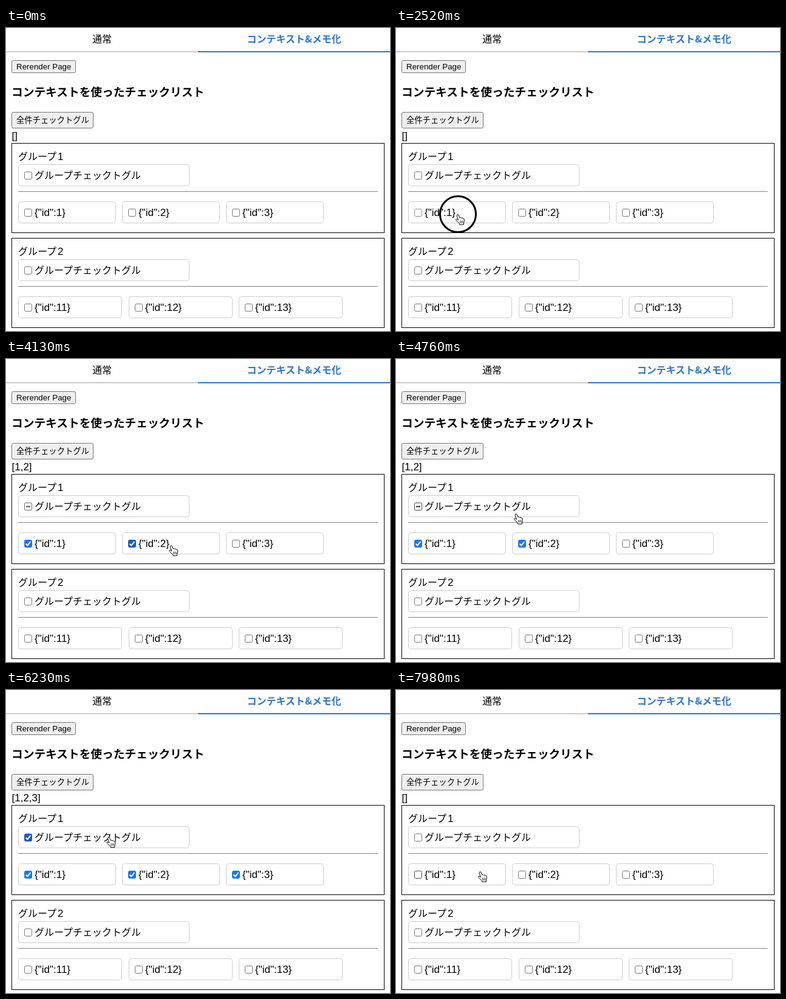
Animation of 632x498 px, one loop 8 s. Source, as an HTML page:

```html
<!DOCTYPE html>
<html lang="ja">
<head>
<meta charset="utf-8">
<style>
  html, body { margin: 0; width: 100%; height: 100%; overflow: hidden; background: #fff; }
  svg { display: block; width: 632px; height: 498px; }
  text { font: 16px "Noto Sans CJK JP", "Noto Sans CJK", sans-serif; white-space: pre; }
  .latin { font: 17px "Liberation Sans", Arial, sans-serif; }
  .button { font-size: 13.33px; }
  .small { font: 13.33px "Liberation Sans", Arial, sans-serif; }
  .heading { font-size: 18.72px; font-weight: 700; }
  .tab { font-weight: 700; fill: #3178c6; }
</style>
</head>
<body>
<svg id="stage" viewBox="0 0 632 498"></svg>
<script>
const stage = document.getElementById('stage');
const LOOP = 8000, STEP = 70;

function add(name, attrs, parent = stage) {
  const node = document.createElementNS('http://www.w3.org/2000/svg', name);
  set(node, attrs);
  parent.append(node);
  return node;
}
function set(node, attrs) {
  for (const key in attrs) node.setAttribute(key, attrs[key]);
}
function label(x, y, content, cls = '') {
  const node = add('text', { x, y, class: cls });
  node.textContent = content;
  return node;
}
// Outline whose outer edge is exactly x, y, width, height.
function frame(x, y, width, height, stroke, rx = 0, fill = 'none') {
  return add('rect', { x: x + .5, y: y + .5, width: width - 1, height: height - 1, rx, stroke, fill });
}
function show(node, visible) {
  node.style.display = visible ? '' : 'none';
}

// Checkbox inside a bordered label; remembers its hit area.
function checkbox(x, y, width, content, cls) {
  frame(x, y, width, 36, '#ccc', 4);
  const box = frame(x + 10, y + 12, 13, 13, '#767676', 2);
  const tick = add('path', {
    d: `M${x + 12.6} ${y + 18.7}l2.7 2.8 5-6.4`, fill: 'none', stroke: '#fff', 'stroke-width': 2
  });
  const dash = add('path', { d: `M${x + 13} ${y + 18.5}h7`, 'stroke-width': 2 });
  label(x + 27, y + 24, content, cls);
  return { x, y, width, box, tick, dash };
}

function group(y, number, ids, width, pitch) {
  frame(9, y, 614, 148, '#000');
  label(20, y + 28, 'グループ');
  label(85, y + 28, number, 'latin');
  const toggle = checkbox(20, y + 35, 282, 'グループチェックトグル');
  add('rect', { x: 20, y: y + 79, width: 592, height: 1.3, fill: '#9a9a9a' });
  const items = ids.map((id, i) =>
    checkbox(20 + Math.round(i * pitch), y + 96, width, `{"id":${id}}`, 'latin'));
  return { toggle, items };
}

label(142, 24, '通常');
label(396.5, 24, 'コンテキスト&メモ化', 'tab');
add('rect', { x: 0, y: 38, width: 316, height: 2, fill: '#ccc' });
add('rect', { x: 316, y: 38, width: 316, height: 2, fill: '#3178c6' });
frame(9, 53, 106, 21, '#767676', 2.5, '#efefef');
label(17, 68, 'Rerender Page', 'small');
label(9, 112, 'コンテキストを使ったチェックリスト', 'heading');
frame(9, 138, 135, 27, '#767676', 2.5, '#efefef');
label(17, 156, '全件チェックトグル', 'button');
const list = label(9.5, 183, '[]', 'latin');
const first = group(189, 1, [1, 2, 3], 161, 171);
const second = group(345, 2, [11, 12, 13], 171, 181.5);
const boxes = [first.toggle, ...first.items, second.toggle, ...second.items];

const ring = add('circle', { fill: 'none', stroke: '#000', 'stroke-width': 3 });
const arrow = add('path', {
  d: 'M0 0V14L3.2 11 5.4 16 7.8 15 5.7 10.2H10Z', stroke: '#fff', 'stroke-width': 1.2, 'paint-order': 'stroke'
});
const hand = add('g', { stroke: '#000', 'stroke-linejoin': 'round', 'stroke-linecap': 'round' });
add('path', {
  d: 'M-2 2.2Q-1.6 -.4 .8 1.2L2.8 5.8Q4.6 4.8 5.5 6.4Q7.4 5.4 8.2 7.2Q10.3 6.8 10.4 9.2' +
     'Q10.6 12 9.4 14.2V17.2H2.6V15.6L-1.4 12Q-4.6 8.6 -2.8 8Q-1.4 7.8 .2 9.4Z',
  fill: '#fff'
}, hand);
add('path', { d: 'M3.6 11v3.4M5.7 11v3.4M7.8 11v3.4', fill: 'none', 'stroke-width': .8 }, hand);

// Time, x, y of the pointer tip.
const path = [
  [630, 251, 435], [1330, 101, 308.5], [1960, 102, 306], [2730, 102, 306], [3150, 282, 308],
  [3360, 253, 306.5], [3990, 253, 306.5], [4480, 350, 304], [4760, 198, 254], [5250, 208, 249],
  [5390, 169.5, 241.5], [7490, 169.5, 241.5], [7980, 139, 298]
];
function pointerAt(t) {
  const next = Math.max(1, path.findIndex(key => key[0] >= t));
  const [t0, x0, y0] = path[next - 1], [t1, x1, y1] = path[next];
  const p = (t - t0) / (t1 - t0), ease = p * p * (3 - 2 * p);
  return [x0 + (x1 - x0) * ease, y0 + (y1 - y0) * ease];
}

const presses = [2520, 3640, 5600, 6790];
const PRESS_TIME = 210;
const rings = [[1470, 21], [2520, 29.5], [3710, 29.5], [5600, 29.5], [6790, 29.5]];

function checkedAt(t) {
  const done = presses.filter(start => t >= start + PRESS_TIME).length;
  return [[], [1], [1, 2], [1, 2, 3], []][done];
}

function paintBox({ box, tick, dash }, state, hover, active) {
  const pick = (normal, over, down) => active ? down : hover ? over : normal;
  const grey = pick('#767676', '#4f4f4f', '#8d8d8d');
  const blue = pick('#1677f2', '#175cc0', '#3793ff');
  const on = state === 'on', mixed = state === 'mixed';
  set(box, { stroke: on ? blue : mixed ? pick('#666', '#444', '#777') : grey, fill: on ? blue : '#fff' });
  set(dash, { stroke: pick('#505050', '#303030', '#666') });
  show(tick, on);
  show(dash, mixed);
}

function render(t) {
  const visible = t >= 630, focused = t >= 1960;
  const [x, y] = visible ? pointerAt(t) : [-99, -99];
  const pressed = presses.some(start => t >= start && t < start + PRESS_TIME);
  const target = focused && boxes.find(b => x >= b.x && x < b.x + b.width && y >= b.y && y < b.y + 36);
  const checked = checkedAt(t);

  list.textContent = `[${checked}]`;
  for (const box of boxes) {
    const index = first.items.indexOf(box);
    let state = checked.includes(index + 1) ? 'on' : 'off';
    if (box === first.toggle) state = ['off', 'mixed', 'mixed', 'on'][checked.length];
    paintBox(box, state, box === target, box === target && pressed);
  }

  show(arrow, visible && !target);
  show(hand, Boolean(target));
  for (const cursor of [arrow, hand]) set(cursor, { transform: `translate(${x} ${y})` });

  const pulse = rings.find(([start]) => t >= start && t < start + STEP);
  show(ring, Boolean(pulse));
  if (pulse) set(ring, { cx: x, cy: y, r: pulse[1] });
}

function tick(now) {
  render(Math.floor(now % LOOP / STEP) * STEP);
  requestAnimationFrame(tick);
}
tick(performance.now());
</script>
</body>
</html>
```
